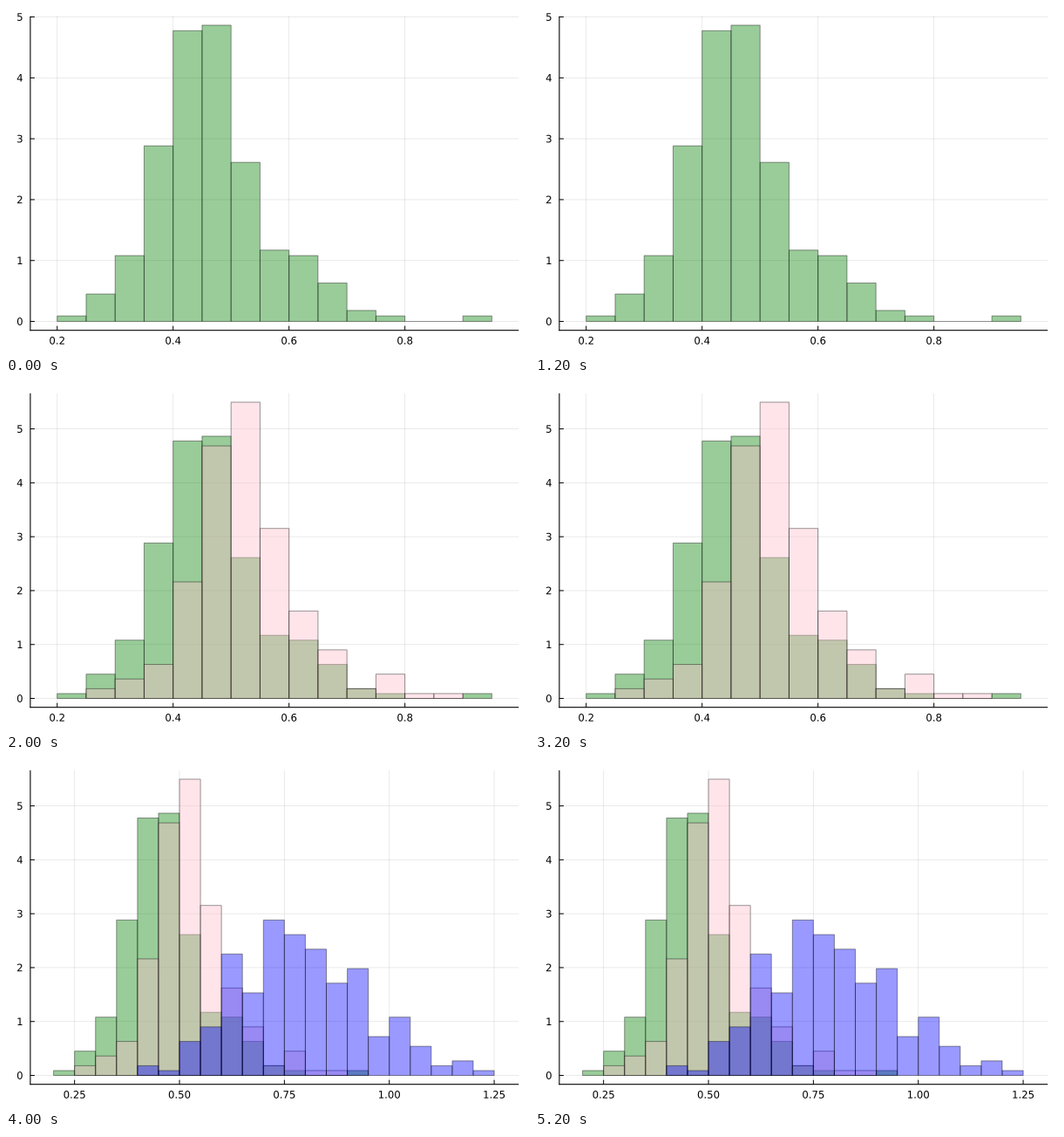
A matplotlib script for the animation above (6 s loop, 600 by 400 pixels).

```python
import matplotlib.pyplot as plt
from matplotlib.animation import FuncAnimation
from matplotlib.patches import PathPatch, Rectangle
from matplotlib.textpath import TextPath
from matplotlib.transforms import Affine2D

W, H, DPI = 600, 400, 100
LEFT, RIGHT, TOP, BOTTOM = 27.9, 588.2, 11.8, 371.7
BIN, SAMPLES = 0.05, 222
FONT_PX = 11.7
DIGIT_H = 0.729 * FONT_PX

# first bin edge, counts per bin, colour
HISTS = [
    (0.20, [1, 5, 12, 32, 53, 54, 29, 13, 12, 7, 2, 1, 0, 0, 1], "green"),
    (0.25, [2, 4, 7, 24, 52, 61, 35, 18, 10, 2, 5, 1, 1], "pink"),
    (0.40, [2, 1, 7, 10, 25, 17, 32, 29, 26, 19, 22, 8, 12, 6, 2, 3, 1],
     "blue"),
]

fig = plt.figure(figsize=(W / DPI, H / DPI), dpi=DPI, facecolor="white")
ax = fig.add_axes([0, 0, 1, 1])


def widen(lo, hi):
    pad = 0.03 * (hi - lo)
    return lo - pad, hi + pad


def limits(hists):
    spans = [widen(x0, x0 + BIN * len(c)) for x0, c, _ in hists]
    xlim = widen(min(s[0] for s in spans), max(s[1] for s in spans))
    peak = max(max(c) for _, c, _ in hists) / (SAMPLES * BIN)
    return xlim, widen(0, peak)


def line(x, y, width=1.0, alpha=1.0):
    ax.plot(x, y, color="black", alpha=alpha, lw=width * 72 / DPI,
            solid_capstyle="butt", snap=False)


def label(text, x, y, align):
    """Outline text at a sub-pixel place; y is the middle of the digits."""
    path = TextPath((0, 0), text, size=FONT_PX)
    # DejaVu Sans advances: digits 0.636 em, point 0.318 em
    width = FONT_PX * sum(0.318 if ch == "." else 0.636 for ch in text)
    shift = Affine2D().scale(1, -1).translate(x - align * width,
                                              y + DIGIT_H / 2)
    ax.add_patch(PathPatch(shift.transform_path(path), fc="black", lw=0,
                           snap=False))


def draw(i):
    ax.clear()
    ax.set(xlim=(0, W), ylim=(H, 0))
    ax.axis("off")

    hists = HISTS[:i + 1]
    (xlo, xhi), (ylo, yhi) = limits(hists)

    def px(x):
        return LEFT + (x - xlo) / (xhi - xlo) * (RIGHT - LEFT)

    def py(y):
        return BOTTOM - (y - ylo) / (yhi - ylo) * (BOTTOM - TOP)

    if i < 2:
        xticks = [(t, f"{t:.1f}") for t in (0.2, 0.4, 0.6, 0.8)]
    else:
        xticks = [(t / 4, f"{t / 4:.2f}") for t in range(1, 6)]
    yticks = range(6)

    for t, _ in xticks:
        line([px(t)] * 2, [TOP, BOTTOM], 0.8, 0.1)
    for t in yticks:
        line([LEFT, RIGHT], [py(t)] * 2, 0.8, 0.1)

    line([LEFT - 0.5, RIGHT], [BOTTOM] * 2, 1.1)
    line([LEFT] * 2, [TOP, BOTTOM + 0.5], 1.1)
    for t, text in xticks:
        line([px(t)] * 2, [BOTTOM, BOTTOM - 5])
        label(text, px(t), 383.4, 0.5)
    for t in yticks:
        line([LEFT, LEFT + 5], [py(t)] * 2)
        label(str(t), 19.6, py(t), 1)

    z = 3
    for x0, counts, color in hists:
        for k, n in enumerate(counts):
            left, right = px(x0 + k * BIN), px(x0 + (k + 1) * BIN)
            base, top = py(0), py(n / (SAMPLES * BIN))
            ax.add_patch(Rectangle((left, top), right - left, base - top,
                                   fc=(color, 0.4), ec=("black", 0.4),
                                   lw=72 / DPI, snap=False, zorder=z))
        z += 1
    return []


anim = FuncAnimation(fig, draw, frames=3, interval=2000, repeat=True,
                     repeat_delay=0, init_func=lambda: draw(0), blit=False)
plt.show()
```
